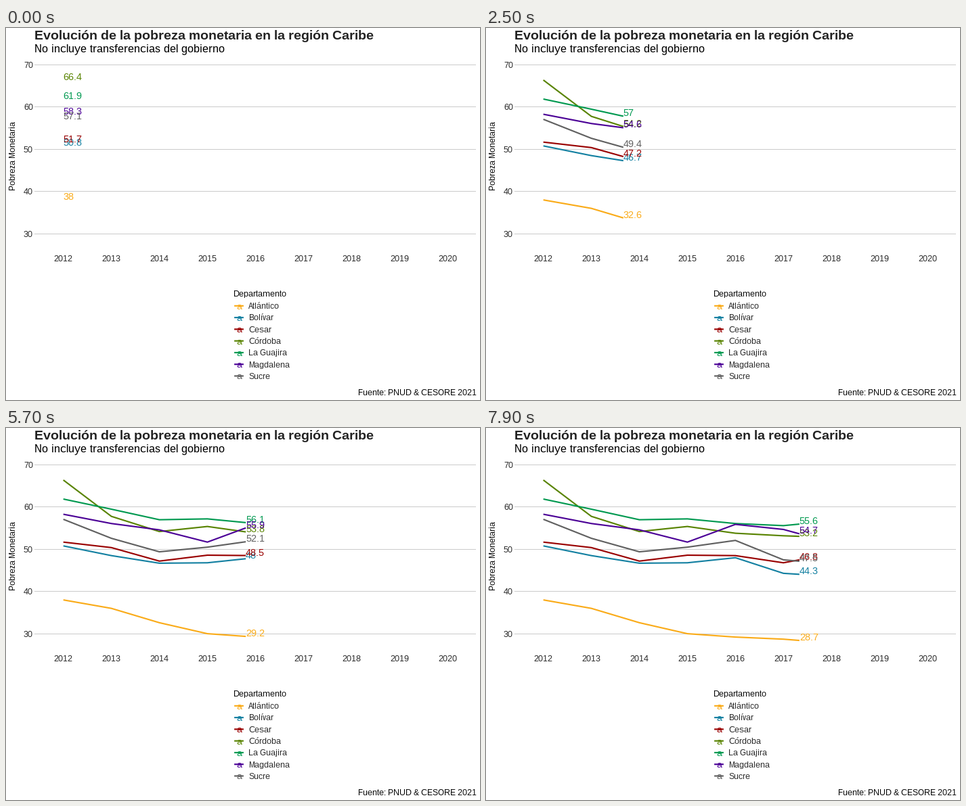
A matplotlib script that plays this animation: 700 px wide and 550 px high, repeating every 8 s.

```python
import numpy as np
import matplotlib.pyplot as plt
from matplotlib.animation import FuncAnimation

plt.rcParams.update({
    "font.family": "Liberation Sans",
    "text.hinting": "native",
    "text.hinting_factor": 1,   # whole-pixel glyph advances
})

W, H, DPI = 700, 550, 100
PX = 72 / DPI                   # points per pixel
FRAMES, INTERVAL = 80, 100
DARK = "#222222"

# name: (colour, yearly values from 2012 on)
SERIES = {
    "Atlántico": ("#FAAB18", [38, 36, 32.6, 30, 29.2, 28.7, 27.8]),
    "Bolívar": ("#1380A1", [50.8, 48.5, 46.7, 46.8, 48, 44.3, 43.6]),
    "Cesar": ("#990000", [51.7, 50.4, 47.2, 48.6, 48.5, 46.8, 48.9]),
    "Córdoba": ("#588300", [66.4, 57.8, 54.2, 55.4, 53.8, 53.2, 52.8]),
    "La Guajira": ("#009950", [61.9, 59.5, 57, 57.2, 56.1, 55.6, 56.7]),
    "Magdalena": ("#4B0096", [58.3, 56.1, 54.6, 51.7, 55.9, 54.7, 51.6]),
    "Sucre": ("#606060", [57.1, 52.6, 49.4, 50.5, 52.1, 47.5, 46.5]),
}

# The full reveal takes 120 steps; each year lands on a whole step.
YEARS = np.arange(9)
YEAR_STEPS = np.round(119 * YEARS / 8)


def px(year):
    return 84.7 + 70.9 * np.asarray(year)


def py(value):
    return 54.5 + 6.24 * (70 - np.asarray(value))


fig = plt.figure(figsize=(W / DPI, H / DPI), dpi=DPI, facecolor="white")
ax = fig.add_axes([0, 0, 1, 1])
ax.set_xlim(0, W)
ax.set_ylim(H, 0)
ax.axis("off")


def text(x, y, s, size=12, color="black", ha="left", **kw):
    return ax.text(x, y, s, fontsize=size * PX, color=color, ha=ha,
                   va="baseline", **kw)


def line(xs, ys, color, width, z):
    return ax.plot(xs, ys, color=color, lw=width * PX, zorder=z, snap=False,
                   solid_capstyle="butt", solid_joinstyle="round")[0]


def draw_frame_parts():
    text(42, 17, "Evolución de la pobreza monetaria en la región Caribe",
         19, DARK, weight="bold")
    text(42, 36, "No incluye transferencias del gobierno", 17)
    text(694.5, 543, "Fuente: PNUD & CESORE 2021", ha="right")
    text(14, 189, "Pobreza Monetaria", ha="center", rotation=90,
         rotation_mode="anchor")
    for v in range(30, 71, 10):
        y = np.floor(py(v)) + 0.5
        line([42, 694], [y, y], "#CBCBCB", 1, 1)
        text(40, y + 4.2, str(v), color=DARK, ha="right")
    for k in YEARS:
        text(px(k), 345, str(2012 + k), color=DARK, ha="center")


def draw_legend():
    text(336, 397, "Departamento")
    for i, (name, (color, _)) in enumerate(SERIES.items()):
        y = 410.8 + 17.28 * i
        line([337.1, 350.9], [y, y], color, 2.13, 2)
        text(344, y + 5, "a", 14.2, color, "center")
        text(358, y + 4.4, name, color=DARK)


draw_frame_parts()
draw_legend()
lines = [line([], [], c, 2.13, 2) for c, _ in SERIES.values()]
labels = [text(0, 0, "", 14.2, c, zorder=4) for c, _ in SERIES.values()]


def update(i):
    now = np.interp(i, YEAR_STEPS, YEARS)
    past = np.arange(np.ceil(now))
    shown = int(now + 0.5)      # label switches halfway between years
    for ln, lab, (_, vals) in zip(lines, labels, SERIES.values()):
        t = np.append(past, now)
        y = py(np.interp(t, YEARS[:len(vals)], vals))
        ln.set_data(px(t), y)
        lab.set_position((px(now), y[-1]))
        lab.set_text(f"{vals[shown]:g}")
    return lines + labels


anim = FuncAnimation(fig, update, frames=FRAMES, interval=INTERVAL,
                     repeat=True, repeat_delay=0, blit=False)
plt.show()
```
